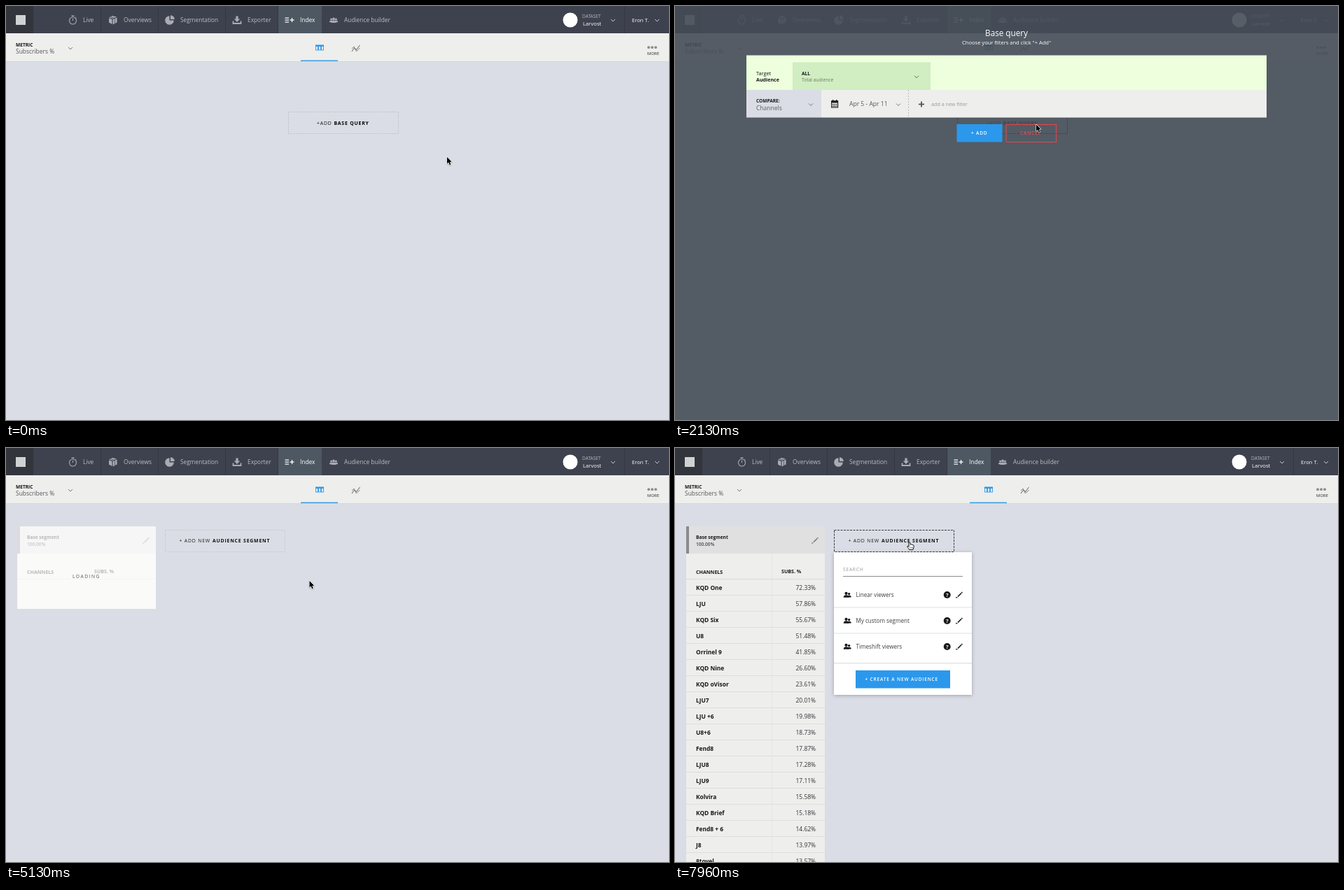
Recreate the animation shown at these times as an HTML page with a canvas. Size 947x592 px, loop 8000 ms.

```html
<!DOCTYPE html>
<html lang="en">
<head>
<meta charset="utf-8">
<title>Audience index</title>
<style>
html, body { margin: 0; width: 100%; height: 100%; overflow: hidden; background: #dadde5; }
canvas { display: block; width: 947px; height: 592px; }
</style>
</head>
<body>
<canvas id="stage" width="947" height="592"></canvas>
<script>
const W = 947, H = 592, LOOP = 8000;
const g = document.getElementById('stage').getContext('2d');
const PAGE = '#dadde5', LIGHT = '#eeeeec', BLUE = '#2b98ec', INK = '#17181b', ICON = '#a9acb3';

const clamp = v => Math.max(0, Math.min(1, v));
const lerp = (a, b, u) => a + (b - a) * u;
function smooth(a, b, t) {
  const u = clamp((t - a) / (b - a));
  return u * u * (3 - 2 * u);
}

// Drawing helpers
function box(x, y, w, h, color) {
  g.fillStyle = color;
  g.fillRect(x, y, w, h);
}
function disc(x, y, r, color) {
  g.fillStyle = color;
  g.beginPath();
  g.arc(x, y, r, 0, 7);
  g.fill();
}
function trace(pts, close) {
  g.beginPath();
  for (let i = 0; i < pts.length; i += 2) g.lineTo(pts[i], pts[i + 1]);
  if (close) g.closePath();
}
function line(pts, color, width = 1) {
  g.strokeStyle = color;
  g.lineWidth = width;
  trace(pts);
  g.stroke();
}
function shape(pts, color) {
  g.fillStyle = color;
  trace(pts, true);
  g.fill();
}
// y is the middle of the capitals
function text(s, x, y, size, color, { weight = 400, gap = 0, align = 'left' } = {}) {
  g.font = `${weight} ${size}px "Open Sans", "Noto Sans", sans-serif`;
  g.letterSpacing = gap + 'px';
  g.textAlign = align;
  g.fillStyle = color;
  g.fillText(s, x, y + size * 0.357);
}
function dashed(x, y, w, h, color, dash) {
  g.setLineDash(dash);
  g.strokeStyle = color;
  g.lineWidth = 1;
  g.strokeRect(x + 0.5, y + 0.5, w - 1, h - 1);
  g.setLineDash([]);
}
function fade(alpha, draw) {
  if (alpha <= 0) return;
  g.save();
  g.globalAlpha *= alpha;
  draw();
  g.restore();
}
const chevron = (x, y, c) => line([x - 3, y - 1.5, x, y + 1.5, x + 3, y - 1.5], c);

function pencil(x, y, color) {
  line([x - 2, y + 2.5, x + 3, y - 2.5], color, 1.7);
  line([x + 3.4, y - 2.9, x + 4.4, y - 3.9], color, 1.7);
  line([x - 5, y + 3.8, x - 2.5, y + 3.8], color, 1.2);
}
function person(x, y, s, color) {
  disc(x, y - 2 * s, 1.9 * s, color);
  shape([x - 3.5 * s, y + 3.5 * s, x - 3 * s, y + 1.3 * s, x - s, y + 0.3 * s,
    x + s, y + 0.3 * s, x + 3 * s, y + 1.3 * s, x + 3.5 * s, y + 3.5 * s], color);
}

function navIcons() {
  g.strokeStyle = ICON;
  g.lineWidth = 1.1;
  g.beginPath();
  g.arc(95.5, 21, 5, 0, 7);
  g.stroke();
  line([95.5, 21, 95.5, 18], ICON);
  line([93.5, 14.2, 97.5, 14.2], ICON, 1.4);
  line([99.4, 16, 100.6, 17.2], ICON);

  shape([147, 16.5, 152, 14, 158, 15.5, 152.5, 18], ICON);
  shape([147, 17.5, 151.5, 19, 151.5, 26, 147, 23.5], ICON);
  shape([152.6, 19, 158.5, 16.6, 158.5, 23.5, 152.6, 26.5], ICON);
  line([149, 15.6, 155, 17.2], '#3e424e', 0.7);
  line([155.5, 17.5, 155.5, 26], '#3e424e', 0.7);

  g.fillStyle = ICON;
  g.beginPath();
  g.moveTo(233.5, 20.5);
  g.arc(233.5, 20.5, 6.3, 0, Math.PI * 1.5);
  g.fill();
  g.beginPath();
  g.moveTo(235, 19);
  g.arc(235, 19, 5.8, -Math.PI / 2, 0);
  g.fill();

  box(328.4, 14.5, 3.2, 5, ICON);
  shape([325.8, 18.5, 334.2, 18.5, 330, 23], ICON);
  line([324.5, 21.5, 324.5, 25, 335.5, 25, 335.5, 21.5], ICON, 1.8);

  for (const y of [16.5, 19.5, 22.5]) box(398.5, y, 5.5, 1.2, '#fff');
  box(405.5, 19.4, 6, 1.3, '#fff');
  box(407.9, 17, 1.3, 6, '#fff');

  person(464.6, 20.5, 0.8, ICON);
  person(471.4, 20.5, 0.8, ICON);
  person(468, 20.5, 1, ICON);
}

function header() {
  box(0, 0, W, 39, '#3e424e');
  box(0, 0, 39, 39, '#32353c');
  box(389, 0, 62, 39, '#4d5862');
  for (const x of [135, 217, 313, 388, 883]) box(x, 0, 1, 39, '#353843');
  box(14, 13, 14, 14, '#d0d1d3');
  navIcons();
  const items = [['Live', 110], ['Overviews', 168], ['Segmentation', 249], ['Exporter', 345],
    ['Index', 420], ['Audience builder', 483]];
  for (const [s, x] of items) text(s, x, 20, 8.35, s === 'Index' ? '#fff' : '#b9bcc2');
  disc(806, 20, 10.5, '#fff');
  text('DATASET', 823, 14.3, 6.6, '#b4b7bd');
  text('Larvost', 824, 25, 7.7, '#fff');
  text('Eron T.', 894, 20.3, 7.6, '#fff');
  chevron(867, 20.5, '#c4c6cb');
  chevron(930, 20.5, '#c4c6cb');

  box(0, 39, W, 40, LIGHT);
  box(0, 79, W, 1, '#d3d6dc');
  text('METRIC', 14, 55.3, 6.6, INK, { weight: 700 });
  text('Subscribers %', 14, 65, 8.45, '#55575c');
  chevron(92, 60.5, '#777');
  box(442, 55.5, 12, 2, BLUE);
  g.strokeStyle = BLUE;
  g.lineWidth = 0.9;
  for (const x of [442.5, 446.5, 450.5]) g.strokeRect(x, 57.5, 3, 5.5);
  line([494, 65, 497.5, 60, 500.5, 62.5, 505.5, 56], '#777', 1.1);
  line([494, 61, 497, 58, 500.5, 65, 505.5, 60], '#777', 0.9);
  box(421, 77.5, 53, 1.5, '#399fe2');
  for (const x of [918, 923, 928]) disc(x, 59.2, 1.9, '#8b8b8d');
  text('MORE', 924.5, 67.6, 5.9, '#222', { align: 'center' });
}

function baseQuery(hover) {
  dashed(403, 151, 158, 32, hover ? '#111' : '#bfc2c8', hover ? [3, 1.5] : [2, 1.5]);
  text('+ADD', 444, 167.3, 6.9, '#111', { gap: 0.8 });
  text('BASE QUERY', 468.5, 167.3, 6.9, '#000', { weight: 700, gap: 0.8 });
}

function dialog() {
  text('Base query', 473.5, 41.5, 11.7, '#fff', { align: 'center' });
  text('Choose your filters and click "+ Add"', 473.5, 55.5, 7.55, '#fff', { align: 'center' });
  box(102, 73.5, 743, 49.5, '#edffdc');
  box(168, 83.5, 197, 39.5, '#d1edc2');
  text('Target', 116, 99.3, 7.3, INK);
  text('Audience', 116, 108.7, 7.1, INK, { weight: 700 });
  text('ALL', 181, 99.2, 6.6, INK, { weight: 700 });
  text('Total audience', 181, 109, 6.7, '#6c7a68');
  chevron(345, 104.3, '#5d7056');
  box(102, 123, 107, 39.5, PAGE);
  box(209, 123, 636, 39.5, LIGHT);
  text('COMPARE:', 116, 138.7, 6.55, INK, { weight: 700 });
  text('Channels', 116, 148.5, 8.5, '#5a5c62');
  chevron(194, 144, '#777');
  g.setLineDash([2, 2]);
  line([333.5, 123, 333.5, 162], '#b9b9b9');
  g.setLineDash([]);

  g.strokeStyle = INK;
  g.lineWidth = 1.1;
  g.strokeRect(223.6, 139, 9, 9);
  box(223, 138.5, 10, 3, INK);
  box(225, 137, 1.3, 2, INK);
  box(230, 137, 1.3, 2, INK);
  for (let i = 0; i < 6; i++) box(225 + i % 3 * 2.4, 143 + (i > 2) * 2.4, 1.4, 1.4, INK);
  text('Apr 5 - Apr 11', 249, 143.3, 8.55, '#55575c');
  chevron(319, 144, '#777');
  box(348, 142.6, 8, 1.8, '#555');
  box(351.1, 139.5, 1.8, 8, '#555');
  text('add a new filter', 366, 143.5, 7.2, '#98999b');
}

function dialogButtons(hover) {
  box(402.5, 172, 65, 25.5, hover ? '#047dd1' : BLUE);
  text('+ ADD', 423, 185, 6.6, '#fff', { weight: 600, gap: 0.8 });
  g.strokeStyle = '#e8464f';
  g.lineWidth = 1;
  g.strokeRect(473, 172.5, 71.5, 25);
  text('CANCEL', 493, 185, 6.6, '#ee4a53', { weight: 600, gap: 0.8 });
}

const rows = [['KQD One', 72.33], ['LJU', 57.86], ['KQD Six', 55.67], ['U8', 51.48],
  ['Orrinel 9', 41.85], ['KQD Nine', 26.6], ['KQD oVisor', 23.61], ['LJU7', 20.01],
  ['LJU +6', 19.98], ['U8+6', 18.73], ['Fend8', 17.87], ['LJU8', 17.28], ['LJU9', 17.11],
  ['Kolvira', 15.58], ['KQD Brief', 15.18], ['Fend8 + 6', 14.62], ['J8', 13.97], ['8tovel', 13.57]];

function table(t) {
  const loaded = t >= 5660;
  const mask = 1 - smooth(5660, 6400, t);
  box(16, 112, 198, 39, '#e0e0e1');
  box(16, 112, 4, 39, '#8b8b8d');
  text('Base segment', 30, 127.3, 6.6, INK, { weight: 700 });
  text('100.00%', 30, 137.2, 6.6, '#44464a', { weight: 600 });
  pencil(200, 132, '#77787a');
  box(16, 151, 198, 79, LIGHT);
  fade(smooth(5640, 6100, t), () => {
    box(16, 230, 198, H - 230, LIGHT);
    rows.forEach(([name, share], i) => {
      const y = 199.7 + 23 * i;
      box(16, 210 + 23 * i, 198, 1, '#dddedf');
      text(name, 30, y, 8.4, INK, { weight: 700 });
      text(share.toFixed(2) + '%', 201, y, 8.45, '#303236', { align: 'right' });
    });
    box(138, 151, 1, H - 151, '#e5e5e5');
  });
  box(16, 187, 198, 1, '#d9dadb');
  text('CHANNELS', 30, 177, 7.1, INK, { weight: 700 });
  text('SUBS. %', loaded ? 152 : 126, 176.5, 7.1, INK, { weight: 700 });
  fade(mask, () => {
    box(16, 112, 198, (loaded ? H : 230) - 112, 'rgba(255,255,255,.7)');
    text('LOADING', 95, 184, 6.7, '#55575c', { gap: 1.5 });
  });
}

function addSegment(hover) {
  dashed(227, 117, 172, 32, hover ? '#3a3c42' : '#c6c9d0', hover ? [3, 1.5] : [2, 1.5]);
  text('+ ADD NEW', 247.5, 133, 6.9, '#222', { gap: 0.8 });
  text('AUDIENCE SEGMENT', 295, 133, 6.9, '#111', { weight: 700, gap: 0.8 });
}

function menu() {
  g.save();
  g.shadowColor = 'rgba(40,45,60,.35)';
  g.shadowBlur = 5;
  g.shadowOffsetY = 1;
  box(227, 149, 197, 204, '#fff');
  g.restore();
  text('SEARCH', 240, 173.3, 6.6, '#999', { gap: 0.8 });
  box(240, 183, 171, 1, '#8d8d8f');
  ['Linear viewers', 'My custom segment', 'Timeshift viewers'].forEach((s, i) => {
    const y = 210 + 37 * i;
    person(248.6, y + 0.4, 0.9, INK);
    person(244.5, y, 1.1, INK);
    text(s, 258.5, y + 0.3, 8.1, '#3c3e43');
    disc(388.7, y, 5, INK);
    text('?', 388.7, y, 7.5, '#fff', { weight: 700, align: 'center' });
    pencil(406, y, INK);
    if (i < 2) box(227, y + 17.5, 197, 1, '#dedfe1');
  });
  box(227, 307, 197, 1, '#e2e3e5');
  box(227, 308, 197, 1, '#f3f3f4');
  box(258, 318, 135, 25.5, BLUE);
  text('+ CREATE A NEW AUDIENCE', 271.5, 331, 6.5, '#fff', { weight: 600, gap: 0.85 });
}

// Pointer
function pointerAt(t) {
  if (t < 2800) {
    const u = smooth(530, 1260, t);
    return [lerp(630, 516, u), lerp(216, 169.5, u)];
  }
  if (t < 3630) {
    const u = smooth(2800, 3430, t);
    return [lerp(516, 337.5, u), lerp(169.5, 110, u)];
  }
  if (t < 7190) {
    const u = smooth(3630, 4330, t), v = 1 - u;
    return [v * v * 337.5 + 2 * u * v * 385 + u * u * 433.5,
      v * v * 110 + 2 * u * v * 222 + u * u * 190];
  }
  const u = smooth(7190, 7560, t);
  return [lerp(433.5, 335.7, u), lerp(190, 134.5, u)];
}
const inside = ([x, y], l, t, r, b) => x >= l && x <= r && y >= t && y <= b;

function pointer([x, y], hand) {
  g.save();
  g.translate(x, y);
  g.lineJoin = 'round';
  if (hand) {
    trace([-2, 0.5, -1, -0.3, 0, 0.5, 0.4, 3.6, 2, 3.3, 3.4, 4, 4.8, 4.3, 5.5, 5.4,
      5.2, 8, 4.2, 11, -1, 11, -2.2, 9, -4, 6.6, -3.4, 5.6, -1.5, 6.6], true);
    g.fillStyle = '#fff';
    g.fill();
    g.strokeStyle = '#111';
    g.lineWidth = 1;
    g.stroke();
    for (const i of [0.3, 2, 3.6]) line([i, 7, i, 9.3], '#333', 0.6);
  } else {
    trace([0, 0, 0, 9.4, 2.1, 7.5, 3.7, 11.2, 5.3, 10.5, 3.8, 6.9, 6.6, 6.7], true);
    g.shadowColor = 'rgba(0,0,0,.35)';
    g.shadowBlur = 1.5;
    g.shadowOffsetY = 0.7;
    g.strokeStyle = '#fff';
    g.lineWidth = 1.3;
    g.stroke();
    g.shadowColor = 'transparent';
    g.fillStyle = '#000';
    g.fill();
  }
  g.restore();
}

function render(t) {
  const pos = pointerAt(t);
  const onBase = inside(pos, 403, 151, 561, 183);
  const onAll = inside(pos, 168, 83, 365, 123);
  const onAdd = inside(pos, 403, 172, 467, 198);
  const onSegment = t > 7190 && inside(pos, 227, 117, 399, 149);

  box(0, 0, W, H, PAGE);
  header();
  if (t < 4860) baseQuery(t > 1430 || onBase);
  if (t >= 5030) {
    table(t);
    addSegment(onSegment);
  }

  // The fade ends a little before the slide; the dim colour turns from green to slate
  const slide = smooth(1715, 2200, t);
  const shown = clamp(slide * 1.07);
  fade(shown * (1 - clamp((t - 5000) / 120)), () => {
    box(0, 0, W, H, `rgba(${lerp(40, 69, shown)},77,${lerp(38, 87, shown)},.9)`);
    g.translate(0, Math.round(-50 * (1 - slide)));
    dialog();
    dialogButtons(t > 3630 && onAdd);
  });
  fade(clamp((t - 7880) / 75), menu);

  const pressed = t >= 7700 && t < 7730;
  const hand = t < 1430 ? onBase
    : t < 2800 ? false
    : t < 5030 ? onAll || (t > 3630 && onAdd)
    : onSegment && !pressed;
  pointer(pos, hand);
}

const start = performance.now();
function tick() {
  render((performance.now() - start) % LOOP);
  requestAnimationFrame(tick);
}
tick();
</script>
</body>
</html>
```
